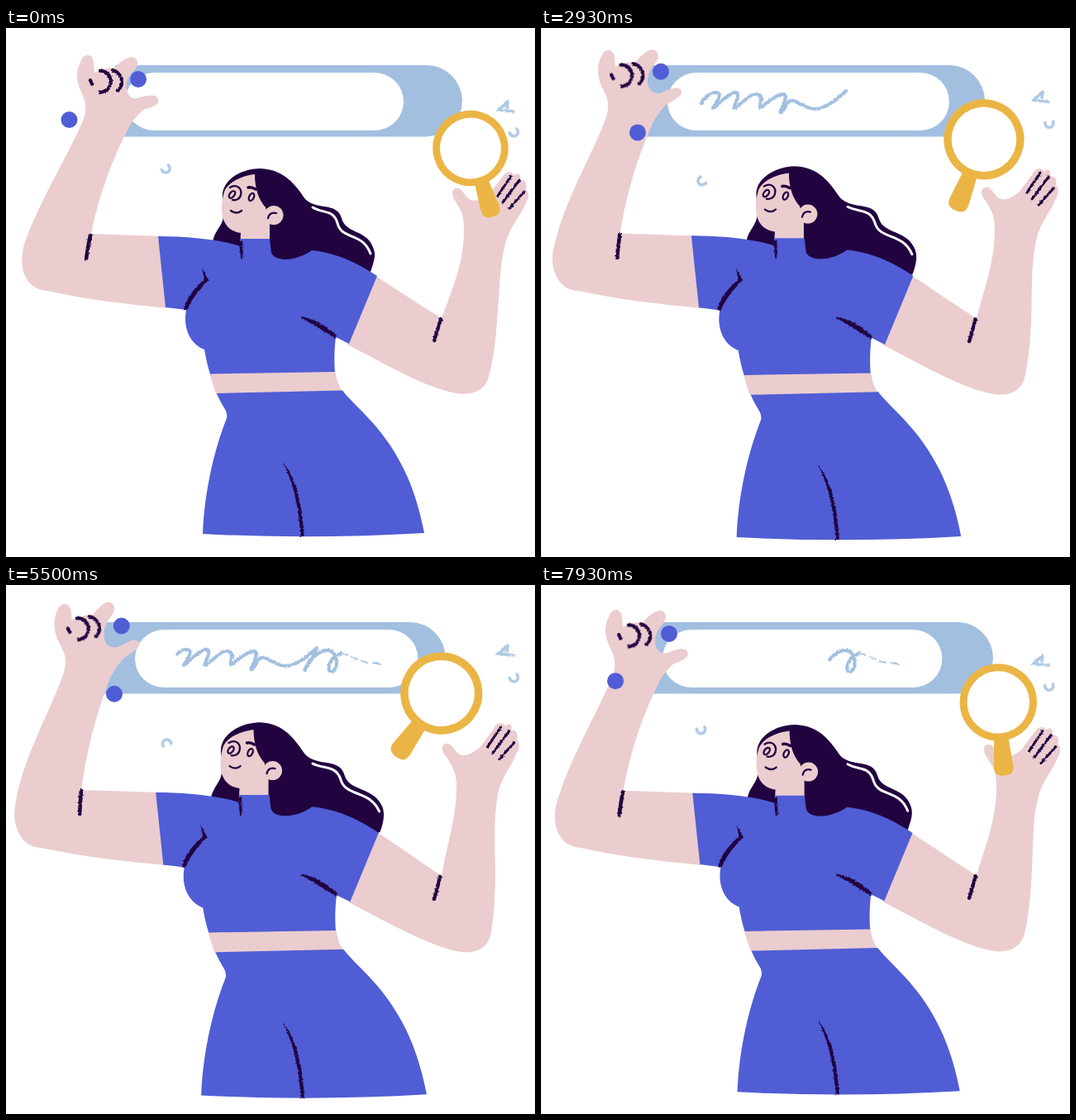
These frames come from a looping animation (640x640 px, 8000 ms). An HTML page:

```html
<!DOCTYPE html>
<html lang="en">
<head>
<meta charset="utf-8">
<title>Search</title>
<style>
  html, body { margin: 0; width: 100%; height: 100%; overflow: hidden; background: #fff; }
  svg { display: block; width: 100vw; height: 100vh; }
  .skin { fill: #ebcdcf; }
  .blue { fill: #505dd5; }
  .dark { fill: #210340; }
  .pale { fill: #a2bfe0; }
  .line { fill: none; stroke: #210340; stroke-linecap: round; stroke-linejoin: round; }
  .chalk { fill: none; stroke: #a2bfe0; stroke-linecap: round; stroke-linejoin: round; }
</style>
</head>
<body>
<svg viewBox="0 0 640 640">
  <defs>
    <filter id="rough" filterUnits="userSpaceOnUse" x="-40" y="-40" width="720" height="720" color-interpolation-filters="sRGB">
      <feTurbulence type="fractalNoise" baseFrequency=".4" numOctaves="2" seed="4"/>
      <feColorMatrix values="1 0 0 0 0  0 1 0 0 0  0 0 1 0 0  0 0 0 0 1" result="noise"/>
      <feDisplacementMap in="SourceGraphic" in2="noise" scale="3.2" xChannelSelector="R" yChannelSelector="G"/>
    </filter>
  </defs>

  <path id="bar" class="pale"/>
  <rect id="field" y="54" height="70" rx="35" fill="#fff"/>
  <g id="note" class="chalk" filter="url(#rough)">
    <path id="scribble" stroke-width="4" d="M201,91 C208,80 216,76 222,79 C226,84 214,97 215,97 C218,98 232,78 243,78
      C250,80 238,97 241,97 C246,97 258,78 270,80 C278,83 268,97 273,96 C280,92 290,80 301,80 C308,84 292,104 298,102
      C303,98 304,86 313,88 C325,94 335,102 350,95 C362,90 370,82 376,76 C374,84 366,97 361,103
      C366,92 378,78 390,79 C402,82 403,103 394,105 C386,104 392,87 405,83"/>
    <g id="tail" stroke-width="1.8">
      <path d="M408,83 L413,85"/><path d="M418,87 L425,90"/><path d="M430,92 L437,94"/><path d="M444,94 L454,96"/>
    </g>
  </g>

  <g filter="url(#rough)" class="chalk" opacity=".85">
    <path id="spark" stroke-width="3.6" stroke-linejoin="miter" d="M607,89 L596,99 L614,101 M607,89 L606,96"/>
  </g>
  <g class="chalk" opacity=".85" stroke-width="3.6" stroke-linecap="butt">
    <path id="hookA" d="M-5,-3 C-6,6 6,6 5,-3"/>
    <path id="hookB" d="M-5,-3 C-6,6 6,6 5,-3"/>
  </g>

  <path id="armR" class="skin"/>
  <path id="armL" class="skin"/>
  <g class="line" filter="url(#rough)">
    <path id="creaseL" stroke-width="4.600"/>
    <path id="creaseR" stroke-width="4.400"/>
  </g>
  <g id="knuckles">
    <path class="line" filter="url(#rough)" stroke-width="4" d="M102,63 L104,68 M114,52 C127,50 135,74 114,78 M129,51 C140,54 144,69 135,76"/>
  </g>
  <g id="fingers">
    <path class="line" filter="url(#rough)" stroke-width="3" d="M611,179 L595,203 M621,184 L601,211 M627,198 L609,218"/>
  </g>

  <path id="hair" class="dark"/>
  <path id="shine" fill="none" stroke="#fff" stroke-width="3" stroke-linecap="round"/>
  <g id="head">
    <path class="skin" d="M301,177 C284,179 268,187 264,198 C260,212 260,226 264,234 C268,243 276,247 284,248 L283,264 L319,264 L319,236 L314,217 C306,208 301,195 301,177 Z"/>
    <ellipse class="skin" cx="324" cy="226.500" rx="11.500" ry="11.500"/>
    <g class="line" stroke-width="2.300">
      <ellipse cx="273.500" cy="201.500" rx="2.800" ry="4.800" transform="rotate(38 273.500 201.500)"/>
      <path d="M271,193 C279,188 286,194 284,202 C283,207 278,209 274,208"/>
      <ellipse cx="297" cy="204.500" rx="2.800" ry="4.800" transform="rotate(25 297 204.500)"/>
      <path stroke-width="3.500" d="M293,193 Q297,192 302,195"/>
      <path d="M272,221 Q279,226 285,221"/>
      <path d="M317,230 Q319,222 327,224"/>
    </g>
  </g>

  <g id="body">
    <path class="skin" d="M246,417 L398,414 C400,425 402,433 408,441 L255,444 C251,435 249,427 246,417 Z"/>
    <path class="blue" d="M184,252 C220,252 260,256 283,264 L283,255 L319,255 L321,272 C325,282 348,284 370,269 C400,272 425,284 449,300 L415,382 L399,374 C397,390 397,405 398,416 L247,418.500 C244,410 242,400 240,389 C222,382 214,362 218,341 L193,338 Z"/>
    <path class="blue" d="M255,442 L407,438.500 C430,468 485,500 506,611 Q370,619 238,612 C240,560 252,510 267,472 Q268,468 266,463 C262,456 258,450 255,442 Z"/>
    <g class="dark" filter="url(#rough)">
      <path d="M282,259 L286,257 L287,278 L284,279 Z"/>
      <path d="M237,290 L245,305 C234,317 224,328 219,342 L215,340 C218,326 229,314 240,304 Z"/>
      <path d="M357,349 C375,352 388,361 400,372 L399,376 C386,368 373,359 357,351 Z"/>
      <path d="M336,526 C352,548 359,580 360.500,615 L356.500,615 C354,582 349,553 336,528 Z"/>
    </g>
  </g>

  <g id="glass">
    <path fill="#ebb545" d="M-8.500,42 L8.500,42 L11.500,76 Q12,87 2,87 L-3,87 Q-12,86 -11.500,76 Z"/>
    <circle r="41.300" fill="#fff" stroke="#ebb545" stroke-width="8.800"/>
  </g>
  <circle id="dotA" class="blue" r="10"/>
  <circle id="dotB" class="blue" r="10"/>
</svg>

<script>
const LOOP = 8000;
const $ = id => document.getElementById(id);
const set = (id, attrs) => { for (const k in attrs) $(id).setAttribute(k, attrs[k]); };
const lerp = (a, b, p) => a + (b - a) * p;

// Smooth curve through values at the shared key times.
const KEYS = [0, 2000, 2930, 3570, 4750, 5500, 7000, 7930, 9300];
function track(v) {
  const last = KEYS.length - 1;
  const slope = i => i === 0 || i === last ? 0 : (v[i + 1] - v[i - 1]) / (KEYS[i + 1] - KEYS[i - 1]);
  return t => {
    let i = 0;
    while (i < last - 1 && t >= KEYS[i + 1]) i++;
    const h = KEYS[i + 1] - KEYS[i], u = (t - KEYS[i]) / h, w = 1 - u;
    return v[i] * (1 + 2 * u) * w * w + v[i + 1] * u * u * (3 - 2 * u)
      + h * u * w * (slope(i) * w - slope(i + 1) * u);
  };
}

// Blend two paths that share the same commands.
function blend(a, b) {
  const num = /-?\d+(\.\d+)?/g, to = b.match(num).map(Number);
  return p => { let i = 0; return a.replace(num, n => lerp(+n, to[i++], p).toFixed(2)); };
}

const swing = track([0, .36, .715, .895, 1, .965, .59, .24, 0]);
const reachL = track([0, .29, .6, .81, .98, .97, .65, .28, 0]);
const reachR = track([0, .28, .55, .74, .97, .98, .7, .33, 0]);
const spin = track([-35, 0, 50, 92, 134, 160, 265, 345, 375]);

const armL = blend(
  'M190,252 L103,249 C110,215 122,172 146,126 C152,113 160,103 168,98 C179,96 186,92 184,86 C181,79 171,82 162,84 C155,87 150,85 147,78 C143,68 148,58 156,50 C161,44 160,36 152,35 C145,36 138,41 131,48 C122,48 114,50 107,54 C106,48 107,43 105,38 C103,31 94,31 91,39 C87,48 84,55 87,66 C90,80 98,86 96,102 C93,122 50,192 28,246 C18,268 18,284 21,295 C26,310 36,317 50,318 C100,329 145,334 195,339 Z',
  'M188,251 L91,248 C95,215 104,170 119,130 C123,114 131,100 142,88 C152,81 163,75 160,69 C157,63 149,67 141,72 C134,76 127,77 121,71 C115,62 117,50 126,38 C132,31 132,22 124,20 C117,20 110,28 104,36 C95,36 86,38 79,42 C78,36 79,31 76,26 C73,20 65,22 62,29 C58,37 56,46 59,58 C62,72 73,80 71,96 C69,122 20,205 12,260 C8,278 10,288 14,297 C20,312 30,317 42,318 C95,329 140,334 193,339 Z');
const armR = blend(
  'M440,295 L449,301 C475,318 505,338 527,351 C540,315 554,285 554,245 C554,225 551,222 545,212 C539,203 538,196 544,194 C550,192 553,199 558,205 C565,213 578,207 586,200 C590,193 598,184 603,177 C607,173 613,174 614,178 C619,174 624,177 622,184 C628,183 631,189 629,195 C634,200 632,206 629,212 C622,228 610,240 605,258 C597,285 598,310 595,340 C593,375 590,400 584,422 C579,440 562,446 540,441 C500,432 455,404 413,383 Z',
  'M442,295 L452,301 C478,318 506,338 527,352 C533,315 544,285 545,245 C545,228 541,222 534,210 C527,203 525,194 531,192 C538,190 541,198 546,203 C553,210 566,204 575,194 C580,187 587,178 592,170 C596,165 603,167 604,171 C609,165 613,169 611,176 C617,174 620,181 618,187 C622,191 621,199 617,204 C611,220 599,233 595,252 C590,280 591,310 592,345 C592,375 590,405 586,425 C580,443 563,447 545,443 C505,434 458,406 415,384 Z');
const hair = blend(
  'M262,205 C260,186 282,170 308,170 C336,171 350,189 362,207 C376,221 400,210 406,230 C411,250 438,243 445,268 C448,277 444,285 441,295 L425,310 L370,285 L290,290 L250,259 C252,245 262,240 263,228 Z',
  'M260,202 C258,183 281,166 308,166 C336,167 350,187 362,205 C378,221 404,208 410,231 C416,250 446,244 456,269 C459,278 457,288 453,299 L428,310 L370,285 L290,290 L248,257 C251,243 261,238 261,225 Z');
const shine = blend(
  'M371,217 C384,225 396,219 401,236 C406,257 431,246 441,273',
  'M371,216 C386,223 399,218 405,235 C411,257 440,247 452,274');
const creaseL = blend('M102,251 Q99,265 97,279', 'M91,249 Q89,263 89,277');
const creaseR = blend('M526,352 Q522,366 518,378', 'M525,353 Q522,367 518,380');

const PEN = 445;
const unit = $('scribble').getTotalLength() / PEN;

function draw(t) {
  const g = swing(t), l = reachL(t), r = reachR(t);

  const right = lerp(552, 531, g) - 43, left = lerp(132, 112, l);
  set('bar', { d: `M${left},45 H${right} a43,43.200 0 0 1 0,86.400 H${left} Z` });
  const x = lerp(144, 156.5, g);
  set('field', { x, width: lerp(481, 499, g) - x });

  // The line is written, then wiped from its start.
  const end = Math.max(0, (t - 870) * .15), from = Math.max(0, (t - 5430) * .142);
  const shown = Math.max(0, Math.min(end, PEN) - from);
  set('note', { transform: `translate(${28 * (g - .965)} 0)` });
  set('scribble', {
    'stroke-dasharray': `${shown * unit} 9999`,
    'stroke-dashoffset': -from * unit,
    visibility: shown > 0 ? 'visible' : 'hidden'
  });
  [...$('tail').children].forEach((el, i) =>
    el.setAttribute('visibility', end > PEN + 6 + 13 * i ? 'visible' : 'hidden'));

  set('spark', { transform: `translate(0 ${-16.5 * g})` });
  set('hookA', { transform: `translate(194 ${lerp(171, 191.5, g)}) rotate(${spin(t)})` });
  set('hookB', { transform: `translate(615 ${lerp(127, 112.5, g)}) rotate(${-28 + 28 * Math.sin(Math.PI * g)})` });

  set('armL', { d: armL(l) });
  set('armR', { d: armR(r) });
  set('creaseL', { d: creaseL(l) });
  set('creaseR', { d: creaseR(r) });
  set('knuckles', { transform: `translate(${-28 * l} ${-12.5 * l}) rotate(${-5 * l} 120 64)` });
  set('fingers', { transform: `translate(${-12.5 * r} ${-7.5 * r})` });

  set('hair', { d: hair(g) });
  set('shine', { d: shine(g) });
  set('head', { transform: `translate(${-1.5 * g} ${-2 * g})` });
  set('body', { transform: `translate(342 310) scale(${1 + .0185 * g}) translate(-342 -310)` });

  set('glass', {
    transform: `translate(${lerp(562, 525.5, g)} ${lerp(145.5, 130.5, g)}) rotate(${lerp(-18, 37.5, g)}) scale(${lerp(1, 1.088, g)})`
  });
  set('dotA', { cx: lerp(160, 139, g), cy: lerp(62, 49, g) });
  set('dotB', { cx: lerp(76.5, 133, g), cy: lerp(111, 132.5, g) });
}

const start = performance.now();
function frame() {
  draw((performance.now() - start) % LOOP);
  requestAnimationFrame(frame);
}
frame();
</script>
</body>
</html>
```
